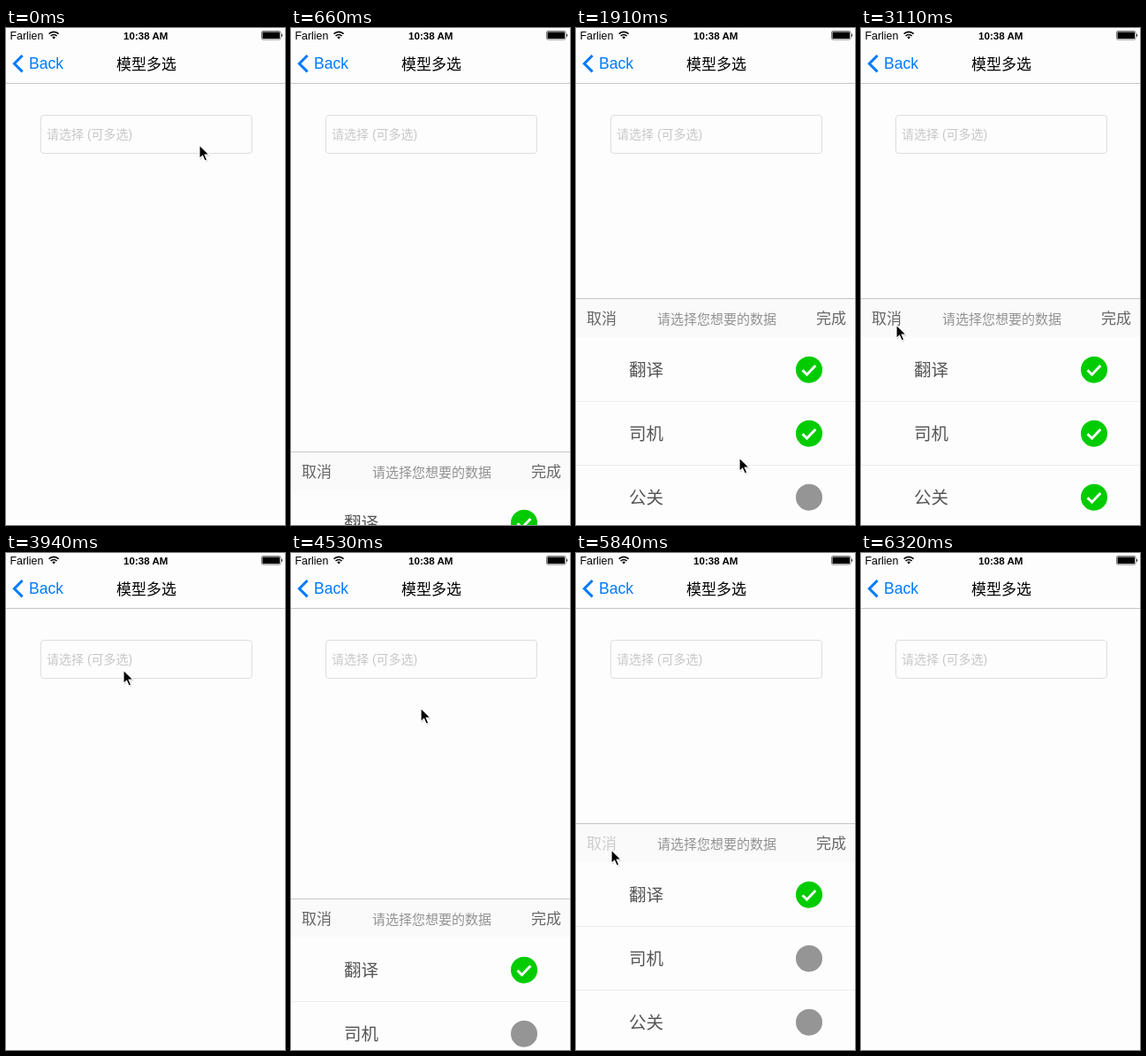
Recreate the animation shown at these times as an HTML page. Size 316 px wide and 561 px high, loop 6.5 s.

```html
<!DOCTYPE html>
<html lang="zh-CN">
<head>
<meta charset="utf-8">
<style>
  html, body { margin: 0; height: 100%; overflow: hidden; background: #fdfdfd; }
  svg { display: block; font-family: "Liberation Sans", "Noto Sans CJK SC", "Noto Sans CJK", sans-serif; }
  .line { stroke: #c6c6c6; }
  .nav { font-size: 17px; font-weight: 500; }
  .tool { font-size: 17px; fill: #666; }
  .row { font-size: 19.5px; fill: #555; }
</style>
</head>
<body>
<svg width="316" height="561" viewBox="0 0 316 561">
  <!-- status bar -->
  <text x="4.5" y="12.6" font-size="12.4">Farlien</text>
  <g fill="none" stroke="#000" stroke-width="1.6">
    <path d="M48.6 6.6a7.8 7.8 0 0 1 11 0M50.6 9a5 5 0 0 1 7 0"/>
    <path d="M54.1 12.6l-1.8-2.2a2.6 2.6 0 0 1 3.6 0z" fill="#000" stroke="none"/>
  </g>
  <text x="133" y="12.6" font-size="11.6" font-weight="700">10:38 AM</text>
  <rect x="289.5" y="3.5" width="21.5" height="9.5" rx="1.5" fill="none" stroke="#777"/>
  <rect x="290.5" y="4.5" width="19.5" height="7.5" rx=".5"/>
  <path d="M312 6.3q2 2 0 4z"/>

  <!-- navigation bar -->
  <path d="M18.6 31L9.4 40.2l9.2 9.2" fill="none" stroke="#007aff" stroke-width="3"/>
  <text x="26" y="46" font-size="17.5" fill="#007aff">Back</text>
  <text class="nav" x="125" y="46.5">模型多选</text>
  <path class="line" d="M0 62.5h316"/>

  <rect x="39.5" y="98.5" width="239" height="43" rx="3.5" fill="none" stroke="#dedede"/>
  <text x="46" y="124.6" font-size="14" fill="#c8c8cb">请选择 (可多选)</text>

  <g id="sheet">
    <rect width="316" height="260" fill="#fdfdfd"/>
    <rect width="316" height="44" fill="#fafafa"/>
    <path class="line" d="M0 .5h316"/>
    <text class="tool" id="cancel" x="12" y="29">取消</text>
    <text x="92" y="28.5" font-size="15" fill="#929292">请选择您想要的数据</text>
    <text class="tool" x="272" y="29">完成</text>
    <g id="rows"></g>
  </g>

  <g id="cursor">
    <path d="M0 0V15.5L3.6 12.2 6.2 18 8.8 16.9 6.3 11.2H11.2Z" transform="translate(.8 1.2)" fill="#000" opacity=".2"/>
    <path d="M0 0V15.5L3.6 12.2 6.2 18 8.8 16.9 6.3 11.2H11.2Z" stroke="#fff" stroke-width="1.2"/>
  </g>
</svg>
<script>
const $ = id => document.getElementById(id);
const LOOP = 6500, TOP = 305, HEIGHT = 256;

$('rows').innerHTML = ['翻译', '司机', '公关'].map((name, i) => `
  <g transform="translate(0 ${44 + i * 72})">
    <text class="row" x="60" y="43.8">${name}</text>
    <circle class="dot" cx="264" cy="36.7" r="15"/>
    <path class="tick" d="M256.5 37.2l5 5 9.8-10.2" fill="none" stroke="#fff" stroke-width="3"/>
    ${i < 2 ? '<path d="M0 72.5h316" stroke="#ededed"/>' : ''}
  </g>`).join('');
const dots = document.querySelectorAll('.dot');
const ticks = document.querySelectorAll('.tick');

// Each visit of the sheet: opening and closing time
const visits = [[600, 3590], [4410, 5975]];
const CLOSE_TIME = 345;

// Pointer paths as [time, x, y]; the pointer is hidden between paths
const paths = [
  [[0, 219, 132], [120, 219, 132], [420, 157, 122], [660, 157, 122]],
  [[1250, 232, 463], [1430, 186, 479], [1670, 186, 479], [1850, 185, 479],
   [1910, 185, 485], [2150, 174, 522], [2630, 174, 522], [3110, 40, 335],
   [3590, 40, 335], [3930, 133, 132], [4060, 133, 132], [4180, 133, 128],
   [4410, 133, 128], [4950, 241, 491], [5120, 241, 491], [5600, 40, 335],
   [6080, 40, 335]]
];

// Remaining distance of a critically damped spring
const spring = ms => {
  const s = Math.max(0, ms) * 0.019;
  return (1 + s) * Math.exp(-s);
};

function sheetOffset(t) {
  for (const [open, close] of visits) {
    if (t < open || t >= close + CLOSE_TIME) continue;
    return HEIGHT * (t < close ? spring(t - open) : 1 - spring(t - close));
  }
  return HEIGHT;
}

function pointer(t) {
  const path = paths.find(p => t >= p[0][0] && t < p[p.length - 1][0]);
  if (!path) return null;
  const i = path.findIndex(p => p[0] > t);
  const [t0, x0, y0] = path[i - 1], [t1, x1, y1] = path[i];
  const k = (t - t0) / (t1 - t0), e = k * k * (3 - 2 * k);
  return [x0 + (x1 - x0) * e, y0 + (y1 - y0) * e];
}

function draw(now) {
  const t = now % LOOP;
  const offset = sheetOffset(t);
  $('sheet').setAttribute('transform', `translate(0 ${TOP + Math.round(offset)})`);
  $('sheet').style.display = offset < HEIGHT ? '' : 'none';

  const pressed = t >= 3170 && t < 3300 || t >= 5780 && t < 5910;
  $('cancel').style.opacity = pressed ? 0.3 : 1;

  const checked = [true, t >= 1670 && t < 4000, t >= 2270 && t < 4000];
  checked.forEach((on, i) => {
    dots[i].style.fill = on ? '#0c0' : '#959595';
    ticks[i].style.display = on ? '' : 'none';
  });

  const at = pointer(t);
  $('cursor').style.display = at ? '' : 'none';
  if (at) $('cursor').setAttribute('transform', `translate(${at.map(Math.round).join(' ')})`);
  requestAnimationFrame(draw);
}
draw(0);
</script>
</body>
</html>
```
